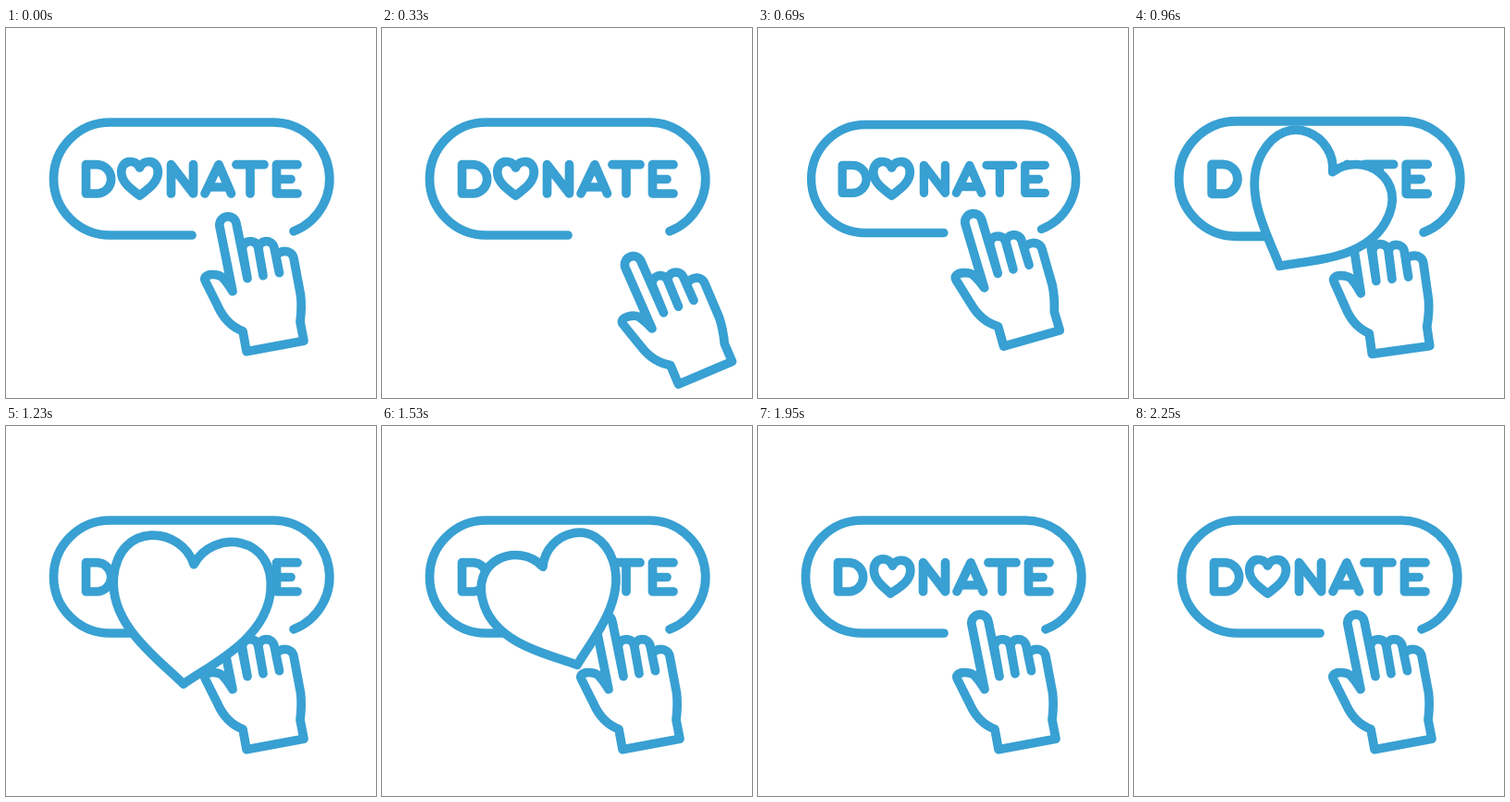
These frames come from a looping animation (400x400 px, 3040 ms). An HTML page:

```html
<!DOCTYPE html>
<html lang="en">
<head>
<meta charset="utf-8">
<title>Donate button</title>
<style>
html, body { margin: 0; width: 100%; height: 100%; overflow: hidden; background: #fff; }
svg { display: block; width: 100%; height: 100%; }
path { stroke: #38a0d2; stroke-width: 9.7; stroke-linecap: round; stroke-linejoin: round; fill: none; }
#hand path, #heart path { fill: #fff; }
#heart path { vector-effect: non-scaling-stroke; }
</style>
</head>
<body>
<svg viewBox="0 0 400 400" role="img" aria-label="DONATE">
  <g id="button">
    <path d="M201 224H112.5A61 61 0 0 1 112.5 102H288.5A61 61 0 0 1 311 219.8"/>
    <path d="M86.5 147.7V179H98A15.65 15.65 0 0 0 98 147.7Z"/>
    <path d="M178.5 179V147.7L202.5 179V147.7"/>
    <path d="M215 179L230 147.7L243.5 179M221 172H238"/>
    <path d="M249 147.7H279M264 147.7V179"/>
    <path d="M315 147.7H292.5V179H315M292.5 163.5H308"/>
  </g>
  <!-- origin at the lower left corner of the cuff -->
  <g id="hand">
    <path transform="translate(-260 -350)" d="M245 285L231 215A9 9 0 0 1 249 211.5L261 271L255.5 240
      C255 229 270 228 272.5 237L278 268L273 239C273 229 288 228 290 238L295.5 265L292 248
      C294 240 309 239 311 249L318.5 289Q320 302 318 318L322 338.5L260 350L256 328
      C243 323 234 312 229 301L215.5 274C211 265 231 265 235 271Q239 275 245 285Z"/>
  </g>
  <g id="heart">
    <path d="M0-12.3C-4-21.6-19.8-21.6-19.8-7.3C-19.8 5-6 12.7 0 17.9C6 12.7 19.8 5 19.8-7.3C19.8-21.6 4-21.6 0-12.3Z"/>
  </g>
</svg>
<script>
const LOOP = 3040, STEP = 30;

const place = (id, value) => document.getElementById(id).setAttribute('transform', value);

function draw(now) {
  const t = Math.floor(now % LOOP / STEP) * STEP;
  // Eased rise from 0 to 1 between two times
  const ramp = (from, to) => {
    const u = Math.min(1, Math.max(0, (t - from) / (to - from)));
    return u * u * (3 - 2 * u);
  };

  // The hand draws back, presses, and rebounds together with the button
  const rebound = 1.8 * ramp(600, 840) - .8 * ramp(840, 1020);
  const squash = ramp(450, 540) - rebound;
  const lean = ramp(290, 540) - rebound;
  const away = ramp(30, 290) - ramp(290, 540);
  place('button', `translate(200.5 163) scale(${1 - .095 * squash}) translate(-200.5 -163)`);
  place('hand', `translate(${260 + 64 * away + 13 * lean} ${349.7 + 39 * away - 13 * lean})
    rotate(${-12.4 * (away + lean)})`);

  // The heart swells, swings from side to side and shrinks back
  const grow = ramp(690, 1040) - ramp(1450, 1750);
  const tilt = 29.5 * ramp(690, 950) - 49 * ramp(950, 1510) + 24.5 * ramp(1510, 1850) - 5 * ramp(1850, 2220);
  place('heart', `translate(${144.5 + 54 * grow} ${163.3 + 39 * grow}) rotate(${tilt}) scale(${1 + 3.3 * grow})`);
}

const start = performance.now();
function tick() {
  draw(performance.now() - start);
  requestAnimationFrame(tick);
}
tick();
</script>
</body>
</html>
```
